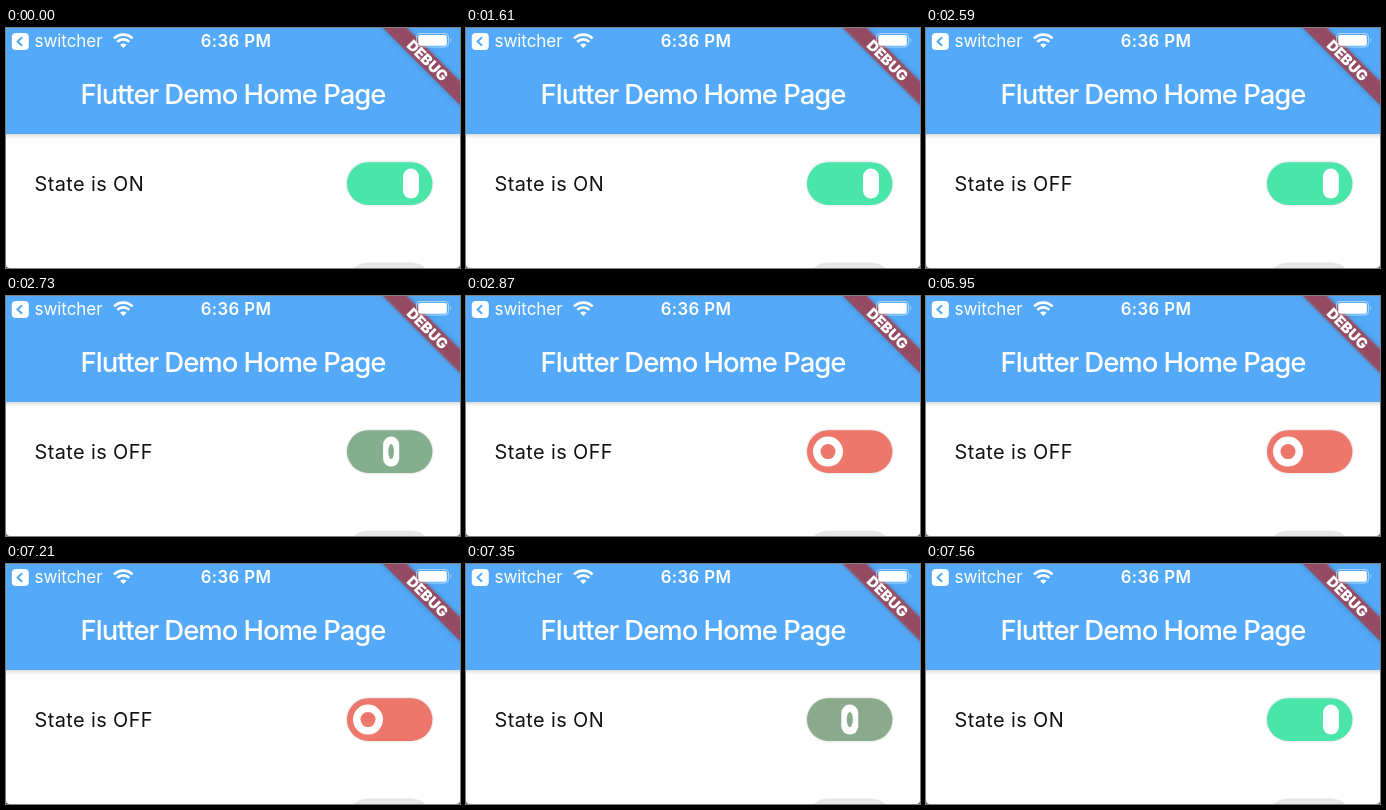
An HTML page for the animation above (8000 ms loop, 454x240 px).

```html
<!DOCTYPE html>
<html lang="en">
<head>
<meta charset="utf-8">
<title>Switch demo</title>
<style>
  html, body { margin: 0; width: 100%; height: 100%; overflow: hidden; background: #6a6a6a; }
  svg { display: block; width: 454px; height: 240px; border-radius: 0 0 4px 4px; background: #fff; }
  text { font-family: Inter, Roboto, sans-serif; fill: #fff; }
  .app { font-size: 17px; letter-spacing: -.05px; }
  .clock { font-size: 16.8px; font-weight: 600; letter-spacing: .35px; text-anchor: middle; }
  .title { font-size: 27.5px; font-weight: 500; letter-spacing: -1.05px; text-anchor: middle; }
  .state { font-size: 19.9px; letter-spacing: .4px; fill: #111; }
  .debug { font-size: 14.7px; font-weight: 900; text-anchor: middle; }
  .bar { filter: drop-shadow(0 1.5px 2.5px rgba(0, 0, 0, .22)); }
  .track { filter: drop-shadow(0 0 1.2px rgba(0, 0, 0, .22)); }
  .banner { filter: drop-shadow(0 0 3px rgba(0, 0, 0, .3)); }
</style>
</head>
<body>
<svg viewBox="0 0 454 240">
  <rect class="bar" x="-8" y="-8" width="470" height="114" fill="#54aaf8"/>

  <rect x="5.8" y="5" width="17" height="17" rx="4" fill="#fff"/>
  <path d="M16 9.3l-4.4 4.2 4.4 4.2" fill="none" stroke="#54aaf8" stroke-width="2"/>
  <text class="app" x="28.5" y="19">switcher</text>
  <g fill="none" stroke="#fff" stroke-width="2.7">
    <path d="M108 10.4a13.2 13.2 0 0 1 18.6 0"/>
    <path d="M111.3 13.9a8.6 8.6 0 0 1 12 0"/>
  </g>
  <path d="M117.3 20l-3.2-3.3a4.6 4.6 0 0 1 6.4 0z" fill="#fff"/>
  <text class="clock" x="230" y="19">6:36 PM</text>
  <text class="title" x="227" y="75.6">Flutter Demo Home Page</text>

  <g transform="translate(454 0) rotate(45)">
    <rect class="banner" x="-57" y="37.5" width="114" height="17" fill="#bc2a2c" fill-opacity=".66"/>
    <text class="debug" x="0" y="51.2">DEBUG</text>
  </g>
  <rect x="410.5" y="5.5" width="32" height="13.5" rx="3.5" fill="none" stroke="#fff" stroke-opacity=".5"/>
  <rect x="412.3" y="7" width="28.5" height="10.7" rx="2" fill="#fff"/>
  <path d="M444.3 10q2 2.2 0 4.4z" fill="#fff" fill-opacity=".6"/>

  <text class="state" x="28.5" y="162.6" id="on">State is ON</text>
  <text class="state" x="28.5" y="162.6" id="off">State is OFF</text>

  <g class="track">
    <rect id="track" x="341" y="134.2" width="85.4" height="42.7" rx="21.4"/>
  </g>
  <rect id="knob" y="140.6" height="30" fill="#fff"/>
  <ellipse id="hole" cy="155.6" ry="7.5"/>
  <rect x="341" y="234.4" width="85.4" height="42.7" rx="21.4" fill="#e6e6e6"/>
</svg>
<script>
  const LOOP = 8000, TURN = 280, OFF_AT = 2590, ON_AT = 7220;
  const $ = id => document.getElementById(id);

  const poses = {
    on:  { fill: '#49e5a9', cx: 405,   knob: 16, hole: 0 },
    mid: { fill: '#83ae8e', cx: 385.3, knob: 16, hole: 5.5 },
    off: { fill: '#ed776b', cx: 362,   knob: 30, hole: 15 }
  };

  const steps = [
    [0, 'on'],
    [OFF_AT, 'on'], [OFF_AT + TURN / 2, 'mid'], [OFF_AT + TURN, 'off'],
    [ON_AT, 'off'], [ON_AT + TURN / 2, 'mid'], [ON_AT + TURN, 'on'],
    [LOOP, 'on']
  ];

  function play(id, frame) {
    const frames = steps.map(([t, name]) => ({ offset: t / LOOP, ...frame(poses[name]) }));
    $(id).animate(frames, { duration: LOOP, iterations: Infinity });
  }

  play('track', p => ({ fill: p.fill }));
  play('knob', p => ({ x: `${p.cx - p.knob / 2}px`, width: `${p.knob}px`, rx: `${p.knob / 2}px` }));
  play('hole', p => ({ fill: p.fill, cx: `${p.cx}px`, rx: `${p.hole / 2}px` }));

  // Labels swap at the moment of the tap.
  function swap(id, first, second) {
    const cuts = [[0, first], [OFF_AT, second], [ON_AT, first], [LOOP, first]];
    $(id).animate(
      cuts.map(([t, opacity]) => ({ offset: t / LOOP, opacity, easing: 'step-end' })),
      { duration: LOOP, iterations: Infinity }
    );
  }

  swap('on', 1, 0);
  swap('off', 0, 1);
</script>
</body>
</html>
```
